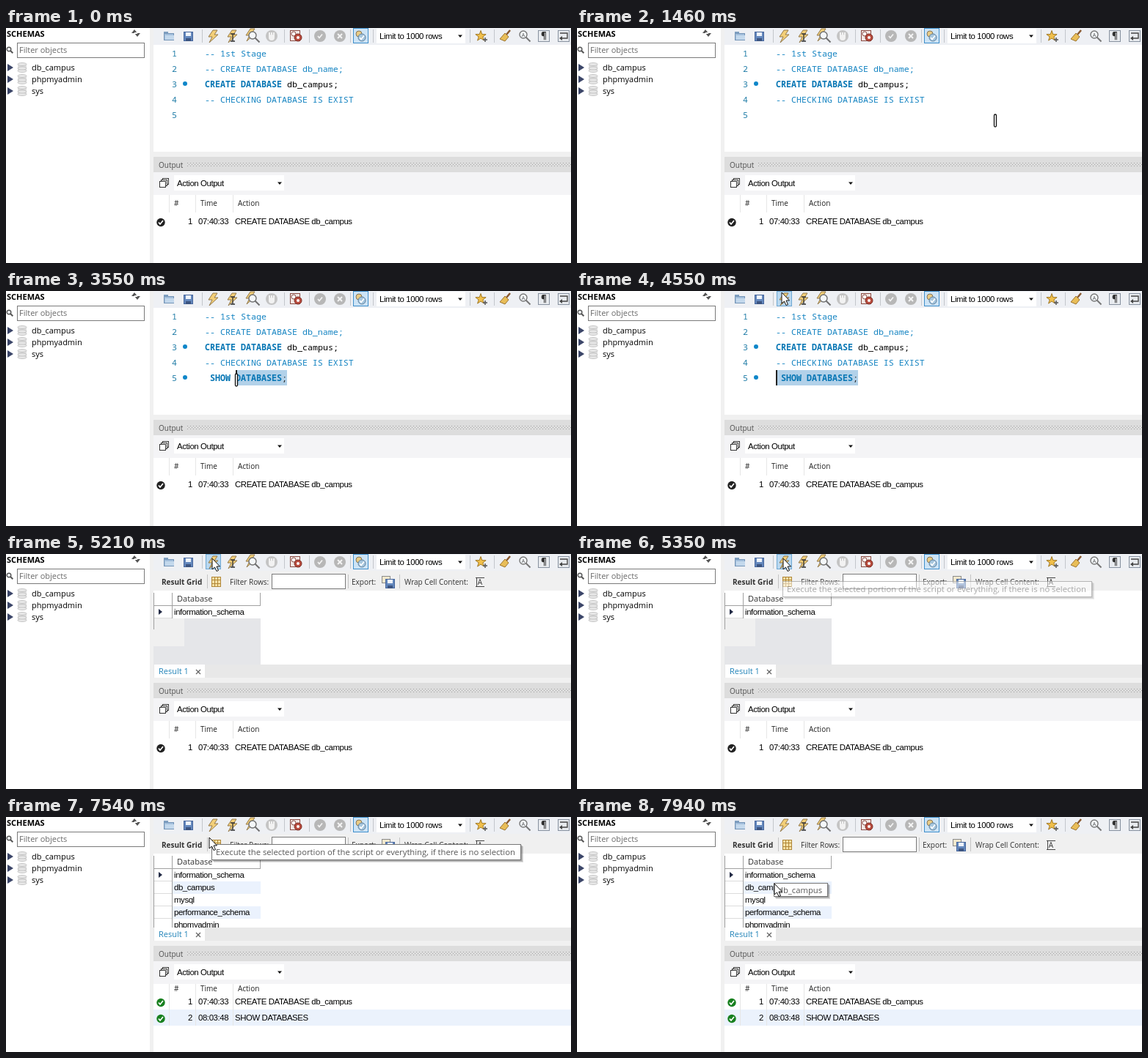
Animation, 770 px wide and 321 px high, one loop 8 s. Source, as an HTML page with a canvas:

```html
<!DOCTYPE html>
<html lang="en">
<head>
<meta charset="utf-8">
<title>SQL editor</title>
<style>
html, body { margin: 0; width: 100%; height: 100%; overflow: hidden; background: #fff; }
canvas { display: block; }
</style>
</head>
<body>
<canvas id="stage" width="770" height="321"></canvas>
<script>
const ctx = document.getElementById('stage').getContext('2d');
const LOOP = 8000;
const GRID = '11.4px "Liberation Sans", Arial, sans-serif';
const UI = '11px "Open Sans", "Noto Sans", sans-serif';
const SMALL = '10px "Open Sans", "Noto Sans", sans-serif';
const TIP = '11.28px "Open Sans", "Noto Sans", sans-serif';
const CODE = '11.667px "Noto Sans Mono", "DejaVu Sans Mono", monospace';
const COMMENT = '#1584c2', KEYWORD = '#0776b4', PANEL = '#f0f0f0';

const clamp = v => Math.max(0, Math.min(1, v));

// ---- Drawing helpers ----
function text(str, x, y, font, color = '#000', align = 'left') {
  ctx.font = font;
  ctx.letterSpacing = font === GRID ? '-0.4px' : '0px';
  ctx.fillStyle = color;
  ctx.textAlign = align;
  ctx.fillText(str, x, y);
}
function rect(x, y, w, h, fill, border) {
  if (fill) { ctx.fillStyle = fill; ctx.fillRect(x, y, w, h); }
  if (border) {
    ctx.strokeStyle = border;
    ctx.lineWidth = 1;
    ctx.strokeRect(x + .5, y + .5, w - 1, h - 1);
  }
}
function paint(fill, stroke, width) {
  if (fill) { ctx.fillStyle = fill; ctx.fill(); }
  if (stroke) { ctx.strokeStyle = stroke; ctx.lineWidth = width; ctx.stroke(); }
}
function poly(x, y, points, fill, stroke, width = 1) {
  ctx.beginPath();
  points.forEach(([px, py]) => ctx.lineTo(x + px, y + py));
  if (fill) ctx.closePath();
  paint(fill, stroke, width);
}
function circle(x, y, r, fill, stroke, width = 1) {
  ctx.beginPath();
  ctx.arc(x, y, r, 0, Math.PI * 2);
  paint(fill, stroke, width);
}
const check = (x, y, color) => poly(x, y, [[-3, 0], [-1, 2.5], [3, -2.5]], null, color, 1.7);
const dropArrow = (x, y) => poly(x, y, [[-3, -1.5], [3, -1.5], [0, 2]], '#111');
function cross(x, y, r, color, width) {
  poly(x, y, [[-r, -r], [r, r]], null, color, width);
  poly(x, y, [[-r, r], [r, -r]], null, color, width);
}
function magnifier(x, y, r, color) {
  poly(x, y, [[r * .7, r * .7], [r * 1.9, r * 1.9]], null, color, 2);
  circle(x, y, r, '#f4f8fb', color, 1.4);
}
function bolt(x, y) {
  poly(x, y, [[0, -8], [6, -8], [2, -2], [7, -2], [-5, 9], [-1, 1], [-6, 1]], '#f3cf78', '#93794a');
}
function cylinder(x, y, w, h) {
  rect(x - w / 2, y - h / 2 + 2, w, h - 4, '#e0e0e0');
  [h / 2 - 2, 1, 2 - h / 2].forEach(dy => {
    ctx.beginPath();
    ctx.ellipse(x, y + dy, w / 2, 2, 0, 0, Math.PI * 2);
    paint('#e8e8e8', '#bcbcbc', .8);
  });
}
function disk(x, y) {
  rect(x - 6, y - 6, 13, 13, '#6488bd', '#47669c');
  rect(x - 3, y - 5, 7, 5, '#eef3fa');
  rect(x - 3, y + 3, 7, 4, '#3c5480');
}

// ---- Window parts ----
function sidebar() {
  rect(0, 0, 196, 321, '#fff');
  text('SCHEMAS', 1, 12, 'bold ' + UI);
  poly(175, 6, [[-4, 1], [0, -4], [4, 1]], '#555');
  poly(179, 8, [[-4, -1], [0, 4], [4, -1]], '#555');
  poly(177, 7, [[-2, 0], [2, 0]], null, '#fff', 2);
  magnifier(4, 29, 2.8, '#555');
  rect(15, 20, 174, 21, '#fff', '#7a7a7a');
  text('Filter objects', 18, 34, UI, '#6a6a6a');
  ['db_campus', 'phpmyadmin', 'sys'].forEach((name, i) => {
    const y = 54 + i * 16;
    poly(2, y, [[0, -5], [8, 0], [0, 5]], '#3b4568');
    cylinder(22, y, 12, 13);
    text(name, 35, y + 4, UI);
  });
}

function toolbar(hover) {
  rect(201, 0, 569, 23, '#eef0f4');
  [267, 379, 413, 469, 500, 632, 665].forEach(x => rect(x, 2, 1, 18, '#c3c6cb'));
  rect(215, 5, 6, 4, '#7f9fc0');
  rect(215, 7, 14, 10, '#a3bfdc', '#7595b7');
  rect(217, 10, 12, 6, '#c3d8ec');
  disk(248, 11);
  if (hover) rect(272, 0, 21, 21, '#b9d8f0', '#6fa8d4');
  bolt(282, 11);
  bolt(308, 11);
  poly(309, 11, [[-3, -3], [3, -3], [0, -3], [0, 7], [-3, 7], [3, 7]], null, '#333', 1.4);
  bolt(333, 9);
  magnifier(336, 10, 5, '#707070');
  circle(362, 11, 8, '#c4c4c4');
  circle(362, 13, 4, '#f2f2f2');
  [358, 361, 364].forEach(x => rect(x, 6, 2, 7, '#f2f2f2'));
  rect(387, 3, 14, 15, '#f2e9e6', '#8a4a42');
  circle(392, 8, 3, '#fff', '#8a4a42');
  circle(398, 13, 5, '#b84a3c', '#7d2f27');
  circle(398, 13, 2, '#fff');
  circle(428, 11, 8, '#b7b7b7');
  check(428, 11, '#f4f4f4');
  circle(455, 11, 8, '#b7b7b7');
  cross(455, 11, 3, '#f4f4f4', 2);
  rect(473, 0, 21, 21, '#cde4f6', '#3f8fcb');
  circle(481, 8, 4, '#e9cc86', '#86765a');
  circle(485, 13, 5, '#a6c6de', '#60819d');
  check(485, 13, '#fff');
  rect(505, 1, 121, 20, '#fff');
  text('Limit to 1000 rows', 509, 15, GRID);
  dropArrow(619, 11);

  const star = Array.from({ length: 10 }, (_, i) => {
    const a = i * Math.PI / 5 - Math.PI / 2, r = i % 2 ? 3 : 7.5;
    return [r * Math.cos(a), r * Math.sin(a)];
  });
  poly(647, 11, star, '#f1c04b', '#a27a28');
  poly(653, 16, [[-3, 0], [3, 0], [0, 0], [0, -3], [0, 3]], null, '#555', 1.5);
  poly(680, 11, [[7, -8], [2, -2]], null, '#8a5a30', 2.5);
  poly(680, 11, [[0, -4], [5, 1], [0, 7], [-7, 4]], '#e8bd58', '#9c7430');
  magnifier(705, 9, 5, '#777');
  text('A', 705, 12, '7px "Open Sans", sans-serif', '#555', 'center');
  rect(725, 3, 16, 16, '#e8ebef', '#87919f');
  text('¶', 733, 15, 'bold 12px "Open Sans", sans-serif', '#333', 'center');
  rect(752, 3, 16, 16, '#e8ebef', '#87919f');
  poly(760, 11, [[-5, -4], [5, -4], [5, 3], [-3, 3]], null, '#444', 1.4);
  poly(757, 14, [[-3, 0], [1, -3], [1, 3]], '#444');
}

function editor(typed, selectFrom, caretX) {
  rect(201, 23, 569, 146, '#fff');
  if (selectFrom) rect(selectFrom, 108, 383 - selectFrom, 21, '#b2d1e9');
  const lines = [
    [['-- 1st Stage', COMMENT]],
    [['-- CREATE DATABASE db_name;', COMMENT]],
    [['CREATE DATABASE', KEYWORD, true], [' db_campus;', '#000']],
    [['-- CHECKING DATABASE IS EXIST', COMMENT]],
    typed ? [[' SHOW DATABASES', KEYWORD, true], [';', '#222']] : []
  ];
  lines.forEach((parts, i) => {
    const y = 39 + i * 21;
    text(i + 1, 233, y, CODE, '#237ea8', 'right');
    let x = 271;
    for (const [str, color, bold] of parts) {
      text(str, x, y, (bold ? 'bold ' : '') + CODE, color);
      x += str.length * 7;
    }
  });
  circle(244, 76, 3, '#0f86c9');
  if (typed === 'marked') circle(244, 118, 3, '#0f86c9');
  if (caretX) rect(caretX, 108, 2, 21, '#222');
}

function resultPanel(loaded) {
  rect(201, 23, 569, 27, PANEL);
  [274, 466, 536].forEach(x => rect(x, 28, 1, 19, '#c4c4c4'));
  text('Result Grid', 212, 42, 'bold ' + SMALL, '#333');
  rect(280, 31, 13, 14, '#f6e0a5', '#b08738');
  [284, 288].forEach(x => rect(x, 31, 1, 14, '#b08738'));
  [35, 40].forEach(y => rect(280, y, 13, 1, '#b08738'));
  text('Filter Rows:', 305, 42, SMALL, '#333');
  rect(362, 27, 101, 21, '#fff', '#7a7a7a');
  text('Export:', 471, 42, SMALL, '#333');
  rect(512, 30, 12, 10, '#f1e8cd', '#8b8b8b');
  disk(523, 40);
  text('Wrap Cell Content:', 543, 42, SMALL, '#333');
  text('A', 646, 42, SMALL, '#333', 'center');
  rect(640, 32, 12, 1, '#444');
  rect(640, 44, 12, 1, '#444');
  rect(641, 33, 1, 11, '#444');

  rect(201, 50, 569, 101, '#fff');
  text('Database', 233, 65, UI, '#333');
  ctx.save();
  ctx.beginPath();
  ctx.rect(201, 50, 569, 101);
  ctx.clip();
  const rows = ['information_schema', 'db_campus', 'mysql', 'performance_schema', 'phpmyadmin'];
  rows.slice(0, loaded ? 5 : 1).forEach((name, i) => {
    const y = 71 + i * 17;
    rect(227, y, 120, 17, i % 2 ? '#ebf2fd' : '#fff');
    rect(201, y + 16, 26, 1, '#dcdcdc');
    text(name, 229, y + 12, GRID);
  });
  poly(208, 79, [[0, -4], [5, 0], [0, 4]], '#222a44');
  if (!loaded) {
    rect(201, 88, 146, 63, '#e5e6e9');
    rect(201, 88, 42, 38, PANEL);
  }
  rect(201, 70, 146, 1, '#a0a0a0');
  rect(201, 53, 1, loaded ? 98 : 50, '#a0a0a0');
  rect(226, 53, 1, loaded ? 98 : 35, '#a0a0a0');
  rect(346, 53, 1, 17, '#a0a0a0');
  ctx.restore();
  rect(201, 151, 569, 19, '#e8e8e8');
  rect(202, 151, 69, 19, '#fff');
  text('Result 1', 208, 164, UI, '#2183b8');
  cross(262, 161, 3, '#666', 1.2);
}

function output(done) {
  rect(201, 169, 569, 7, PANEL);
  rect(201, 176, 569, 21, '#dddddd');
  text('Output', 208, 191, SMALL, '#505050');
  for (let x = 247; x < 770; x += 4) {
    rect(x, 184, 1, 1, '#a2a2a2');
    rect(x + 2, 186, 1, 1, '#a2a2a2');
    rect(x, 188, 1, 1, '#a2a2a2');
  }
  rect(201, 197, 569, 31, '#f4f4f6');
  rect(213, 205, 9, 9, '#fff', '#333');
  rect(211, 207, 9, 9, '#fff', '#333');
  rect(209, 209, 9, 9, '#fff', '#333');
  rect(229, 201, 150, 21, '#fff');
  text('Action Output', 233, 216, GRID);
  dropArrow(373, 212);

  rect(201, 228, 569, 93, '#fff');
  const headY = done ? 238 : 243;
  if (done) rect(201, 263, 569, 22, '#ebf2fc');
  [222, 258, 309].forEach(x => rect(x, 228, 1, done ? 57 : 24, '#e6e6e6'));
  text('#', 229, headY, SMALL, '#222');
  text('Time', 265, headY, SMALL, '#222');
  text('Action', 316, headY, SMALL, '#222');
  const rows = [['07:40:33', 'CREATE DATABASE db_campus'], ['08:03:48', 'SHOW DATABASES']];
  rows.slice(0, done ? 2 : 1).forEach(([time, action], i) => {
    const y = (done ? 252 : 264) + i * 22;
    circle(211, y + 1.5, 5.7, done ? '#18801f' : '#222');
    check(211, y + 1.5, '#fff');
    text(i + 1, 254, y + 4, GRID, '#000', 'right');
    text(time, 262, y + 4, GRID);
    text(action, 312, y + 4, GRID);
  });
}

function tooltip(str, x, y, w, h, alpha) {
  if (alpha <= 0) return;
  ctx.save();
  ctx.globalAlpha = alpha;
  for (const d of [1, 2, 3]) {
    rect(x + d, y + h, w, d, 'rgba(0,0,0,.14)');
    rect(x + w, y + d, d, h - d, 'rgba(0,0,0,.14)');
  }
  rect(x, y, w, h, '#fff', '#767676');
  text(str, x + 6, y + h / 2 + 4, TIP, '#575757');
  ctx.restore();
}

const path = [
  [270, 730, 192], [330, 719, 148], [390, 709, 105], [1200, 709, 105],
  [1400, 570, 126], [1640, 370, 134], [1860, 280, 121], [2700, 280, 121],
  [2720, 391, 121], [3275, 391, 121], [3670, 274, 121], [4020, 274, 121],
  [4290, 276, 74], [4550, 279, 2], [4750, 281, 6], [7475, 281, 6],
  [7540, 277, 28], [7740, 269, 91], [LOOP, 269, 91]
];
function pointerAt(t) {
  const i = path.findIndex((p, k) => k + 1 < path.length && t < path[k + 1][0]);
  const [t0, x0, y0] = path[i], [t1, x1, y1] = path[i + 1];
  const stepped = Math.floor((t - t0) / 65 + .01) * 65;
  const k = clamp(stepped / (t1 - t0));
  return [x0 + (x1 - x0) * k, y0 + (y1 - y0) * k];
}
function arrow(x, y) {
  poly(x, y, [[0, 0], [0, 15], [3.5, 12], [6, 17.5], [8.5, 16.5], [6, 11], [10.5, 11]], '#fff', '#111');
}
function beam(x, y) {
  ctx.beginPath();
  ctx.roundRect(x - 1.5, y - 8, 3, 17, 1.5);
  paint('#fff', '#111', 1.3);
}

function draw(t) {
  const [x, y] = pointerAt(Math.max(t, 270));
  const visible = t >= 270 && (t < 2120 || t >= 2720);
  const queried = t >= 5150;
  const typed = t >= 2720 ? 'marked' : t >= 2120;
  const selectFrom = t < 3340 ? 0 : t >= 3670 ? 271 : 271 + 7 * Math.max(0, Math.round((x - 271) / 7));
  const caretOn = t >= 2120 && (t < 2320 || t >= 2720);
  const caretX = caretOn && Math.min(382, selectFrom || 382);

  rect(0, 0, 770, 321, PANEL);
  sidebar();
  toolbar(t >= 4500 && t < 7540);
  if (queried) resultPanel(t >= 5410);
  else editor(typed, selectFrom, caretX);
  output(t >= 5540);

  const hint = 'Execute the selected portion of the script or everything, if there is no selection';
  tooltip(hint, 280, 37, 422, 22, t < 7610 ? clamp((t - 5270) / 160) : 0);
  tooltip('db_campus', 268, 90, 74, 19, clamp((t - 7790) / 140));

  if (!visible) return;
  const overEditor = !queried && y > 23 && y < 169;
  (overEditor && t >= 390 ? beam : arrow)(x, y);
}

const start = performance.now();
function frame() {
  draw((performance.now() - start) % LOOP);
  requestAnimationFrame(frame);
}
frame();
</script>
</body>
</html>
```
